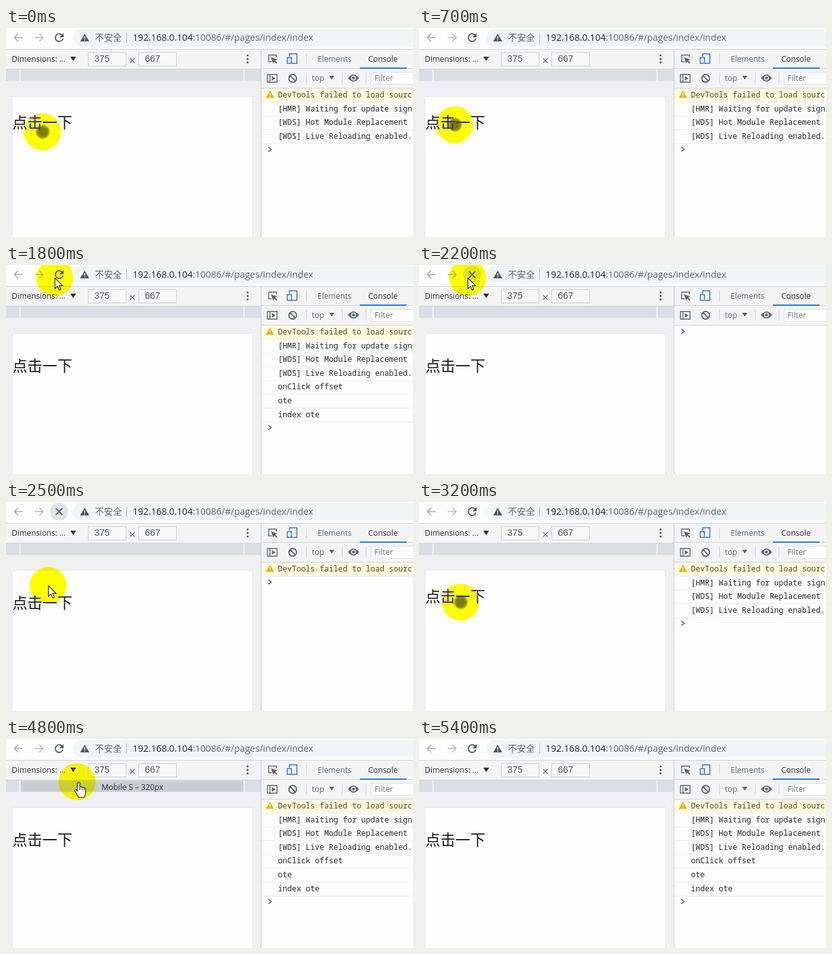
Write an HTML page with a canvas that moves like this. It is 636 px wide and 328 px high and loops after 6.2 s.

```html
<!DOCTYPE html>
<html lang="zh-CN">
<head>
<meta charset="utf-8">
<title>DevTools</title>
<style>
html, body { margin: 0; width: 100%; height: 100%; overflow: hidden; background: #fefefe; }
canvas { display: block; }
</style>
</head>
<body>
<canvas id="stage" width="636" height="328"></canvas>
<script>
const ctx = document.getElementById('stage').getContext('2d');
const LOOP = 6200, STEP = 100;
const UI = '"Open Sans", sans-serif';
const ARIAL = '"Liberation Sans", Arial, sans-serif';
const MONO = '"Noto Sans Mono", monospace';
const CJK = '"Noto Sans CJK SC", "Noto Sans CJK", sans-serif';

const INK = '#2e2e30', GREY = '#5f6368', BLUE = '#2f73d0';
const BAR = '#f4f4f5', LINE = '#d2d3d8', PAPER = '#fefefe';

const LOG = [
  'DevTools failed to load sourc',
  '[HMR] Waiting for update sign',
  '[WDS] Hot Module Replacement',
  '[WDS] Live Reloading enabled.',
  'onClick offset',
  'ote',
  'index ote'
];
const ROW = 21.6;

// Story of one loop, in ms
const FIRST_CLICK = 1000, RELOAD = 2200, WARNED = 2400, LOADED = 3200, SECOND_CLICK = 4100, LEAVE = 5400;

const HOME = { x: 57, y: 163 };
const MOVES = [
  { from: 200, to: 1300, x: 55, y: 146 },
  { from: 1300, to: 1800, x: 76, y: 20 },
  { from: 2300, to: 2650, x: 63, y: 162 },
  { from: 3000, to: 3700, x: 67, y: 151 },
  { from: 4500, to: 4800, x: 111, y: 67 },
  { from: 4800, to: 5200, x: 145, y: 238 },
  { from: 5200, to: 5300, x: 88, y: 180 }
];

const clamp = u => Math.max(0, Math.min(1, u));
const easeOut = u => Math.sin(clamp(u) * Math.PI / 2);

function pointerAt(t) {
  return MOVES.reduce((p, m) => {
    const u = easeOut((t - m.from) / (m.to - m.from));
    return { x: p.x + (m.x - p.x) * u, y: p.y + (m.y - p.y) * u };
  }, HOME);
}

function pageAt(t) {
  const loading = t >= RELOAD && t < LOADED;
  const sinceClick = t - (t < LOADED ? FIRST_CLICK : SECOND_CLICK);
  const slide = clamp((sinceClick + STEP) / (2 * STEP));
  const settled = 4 + (sinceClick >= 0) + 2 * (sinceClick >= 2 * STEP);
  return {
    loading,
    labelY: sinceClick < 0 ? 148 : 158 - 10 * (1 - slide) ** 2,
    rows: loading ? +(t >= WARNED) : settled
  };
}

function rect(x, y, w, h, color) {
  ctx.fillStyle = color;
  ctx.fillRect(x, y, w, h);
}
function box(x, y, w, h, fill, line) {
  rect(x, y, w, h, line);
  rect(x + 1, y + 1, w - 2, h - 2, fill);
}
function text(str, x, y, size, family, color = INK, align = 'left') {
  ctx.font = `${size}px ${family}`;
  ctx.textAlign = align;
  ctx.fillStyle = color;
  ctx.fillText(str, x, y);
}
const label = (str, x, y, color, align) => text(str, x, y, 12.3, UI, color, align);

function disc(x, y, r, color) {
  ctx.beginPath();
  ctx.arc(x, y, r, 0, Math.PI * 2);
  ctx.fillStyle = color;
  ctx.fill();
}
function stroke(d, color, width = 1.5) {
  ctx.strokeStyle = color;
  ctx.lineWidth = width;
  ctx.stroke(new Path2D(d));
}
function fill(d, color) {
  ctx.fillStyle = color;
  ctx.fill(new Path2D(d), 'evenodd');
}
function warning(x, y, size, color) {
  ctx.save();
  ctx.translate(x, y);
  ctx.scale(size, size);
  fill('M0 -6L7 6H-7ZM-.8 -2V2H.8V-2ZM-.8 3V4.500H.8V3Z', color);
  ctx.restore();
}

function drawBrowserBar(loading) {
  rect(0, 0, 636, 33, '#fdfdfd');
  ctx.beginPath();
  ctx.roundRect(105, 1, 560, 28, 14);
  ctx.fillStyle = '#f3f4f6';
  ctx.fill();
  stroke('M26 15H13M19 9L13 15L19 21', '#a8aaae');
  stroke('M45 15H58M52 9L58 15L52 21', '#b6b8bc');
  if (loading) {
    disc(83, 15, 14, '#e3e4e7');
    stroke('M78 10L88 20M88 10L78 20', GREY, 1.8);
  } else {
    stroke('M87.5 11A6 6 0 1 0 89 16.5', '#505357', 1.8);
    fill('M90 8V14.500H83.500Z', '#505357');
  }
  warning(123, 15, 1, '#505357');
  text('不安全', 139, 20, 14, CJK, GREY);
  rect(188, 7, 1, 16, '#b4b6ba');
  const host = '192.168.0.104';
  text(host, 198, 19.6, 14.4, UI, '#242428');
  text(':10086/#/pages/index/index', 198 + ctx.measureText(host).width, 19.6, 14.4, UI, GREY);
}

function drawDevice(labelY, rulerHover) {
  rect(0, 33, 398, 295, '#f0f0f2');
  rect(0, 33, 398, 31, BAR);
  rect(0, 33, 636, 1, LINE);
  label('Dimensions: ...', 9, 53);
  fill('M100.500 45H109.500L105 52Z', INK);
  for (const [x, value] of [[128, '375'], [207, '667']]) {
    box(x, 38, 60, 22, '#f8f8f8', '#cdced2');
    text(value, x + 10, 52.6, 14.4, ARIAL, '#505357');
  }
  stroke('M194 47.500L201 54.500M201 47.500L194 54.500', GREY, 1.1);
  for (let i = 0; i < 3; i++) disc(377.5, 43 + i * 5.5, 1.6, '#505357');

  rect(0, 64, 398, 1, LINE);
  rect(0, 65, 398, 18, '#dcdee4');
  if (rulerHover) {
    rect(23, 66, 348, 17, '#cacdd4');
    label('Mobile S – 320px', 197.5, 80, INK, 'center');
  }
  for (const x of [21, 371]) rect(x, 65, 2, 18, BAR);

  box(9, 107, 377, 230, PAPER, '#e6e6ea');
  text('点击一下', 10, labelY + 8.8, 23.4, CJK, '#18181a');
}

function drawToolbars() {
  rect(399, 34, 237, 61, BAR);
  rect(398, 33, 1, 295, '#c6c8ce');
  stroke('M415 53H410.500V42.500H422.500V46', GREY, 1.4);
  fill('M414 46L424 49.500L420.500 51L424 54.500L422.500 56L419 52.500L417.500 56Z', GREY);
  stroke('M443 45V40.500H454.500V55.500H447M439.500 46.500H446V55.500H439.500Z', BLUE);
  label('Elements', 487, 53, GREY);
  label('Console', 566, 53);
  rect(399, 63, 237, 1, LINE);
  rect(553, 62, 73, 2, BLUE);

  stroke('M408.500 73H423.500V85H408.500ZM412.500 73V85', GREY, 1.4);
  fill('M415.500 75.500L421 79L415.500 82.500Z', GREY);
  stroke('M454 79A6 6 0 1 0 442 79A6 6 0 1 0 454 79M443.700 74.700L452.300 83.300', GREY, 1.8);
  label('top', 478, 83, GREY);
  fill('M505 75H513L509 81Z', GREY);
  fill('M534.500 78.500Q543 67.500 551.500 78.500Q543 89.500 534.500 78.500Z', GREY);
  disc(543, 78.5, 3.8, BAR);
  disc(543, 78.5, 2.3, GREY);
  for (const x of [469, 525, 562]) rect(x, 70, 1, 17, LINE);
  rect(469, 40, 1, 17, LINE);
  box(570, 69, 70, 20, PAPER, '#dfe0e4');
  label('Filter', 576, 83, '#6c6f74');
  rect(399, 94, 237, 1, LINE);
}

function drawConsole(rows) {
  rect(399, 95, 237, 233, PAPER);
  for (let i = 0; i < rows; i++) {
    const y = 105 + i * ROW;
    if (i === 0) {
      rect(399, 95, 237, 21, '#fffae0');
      warning(412.5, 104, 0.92, '#eaae10');
    }
    rect(399, Math.round(y + 11), 237, 1, '#f0f0f3');
    text(LOG[i], 425, y + 4, 12.05, MONO, i ? '#28282a' : '#5c4a14');
  }
  const y = 104 + rows * ROW;
  stroke(`M410 ${y - 3.5}L414.500 ${y}L410 ${y + 3.5}`, BLUE, 1.6);
}

function drawPointer({ x, y }, kind) {
  // Inverts blue: white turns yellow, black turns blue
  ctx.globalCompositeOperation = 'difference';
  disc(x, y, 29, '#0000ff');
  ctx.globalCompositeOperation = 'source-over';
  if (kind === 'touch') {
    const shade = ctx.createRadialGradient(x + 0.5, y, 5, x + 0.5, y, 12);
    shade.addColorStop(0, 'rgba(70,70,20,.72)');
    shade.addColorStop(0.5, 'rgba(70,70,20,.6)');
    shade.addColorStop(1, 'rgba(70,70,20,0)');
    disc(x + 0.5, y, 12, shade);
    return;
  }
  const shape = kind === 'hand'
    ? 'M0 1.500Q2 -1 4 1.500V8Q6 6.500 7.500 8.500Q9.500 7.500 10.500 9.500Q13 9 13 11.500V17L11 24H2L-4 14Q-4 11 -1 12.500L0 14Z'
    : 'M0 0V16.500L4 13L6.700 19L9.200 18L6.600 12H12Z';
  ctx.save();
  ctx.translate(x + 0.5, y + 0.5);
  fill(shape, PAPER);
  stroke(shape, '#202022', 1.1);
  if (kind === 'hand') stroke('M4 8V13M7.500 9V13M10.500 10V13', '#202022', 1);
  ctx.restore();
}

function draw(now) {
  const t = Math.floor((now % LOOP) / STEP) * STEP;
  const { loading, labelY, rows } = pageAt(t);
  const pointer = pointerAt(t);
  const visible = t < LEAVE;
  const onRuler = visible && pointer.y > 62 && pointer.y < 84;
  const onPage = pointer.y > 107 && !loading;
  drawBrowserBar(loading);
  drawDevice(labelY, onRuler);
  drawToolbars();
  drawConsole(rows);
  if (visible) drawPointer(pointer, onRuler ? 'hand' : onPage ? 'touch' : 'arrow');
}

const start = performance.now();
function tick() {
  draw(performance.now() - start);
  requestAnimationFrame(tick);
}
tick();
</script>
</body>
</html>
```
